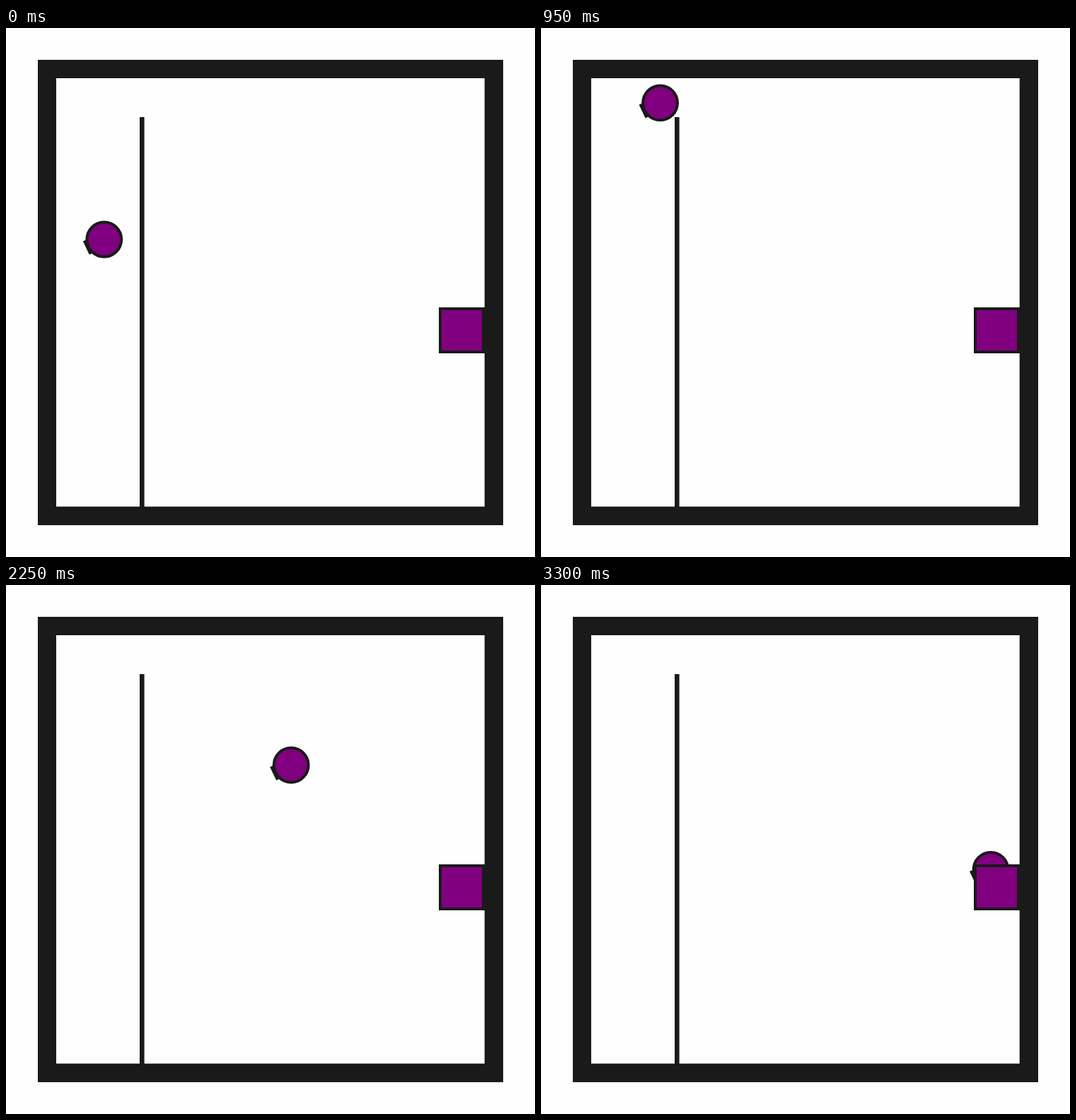
Animation of 748 by 748 pixels, one loop 3350 ms. Source, as an HTML page:

```html
<!DOCTYPE html>
<html lang="en">
<head>
<meta charset="utf-8">
<title>Maze agent</title>
<style>
  html, body { margin: 0; width: 100%; height: 100%; overflow: hidden; background: #fefefe; }
  svg { display: block; width: 100vw; height: 100vh; }
  .wall { fill: #1a1a1a; }
  .piece { fill: #800080; stroke: #1a1a1a; stroke-width: 4; }
</style>
</head>
<body>
<svg viewBox="0 0 748 748">
  <rect class="wall" x="45" y="45" width="658" height="658"/>
  <rect x="71" y="71" width="605.7" height="605.7" fill="#fefefe"/>
  <rect class="wall" x="189" y="126" width="6.6" height="552"/>
  <g id="agent">
    <rect class="wall" x="-28.2" y="-10.5" width="6" height="21" transform="rotate(-25.3)"/>
    <circle class="piece" r="24.4"/>
  </g>
  <rect class="piece" x="614" y="397" width="61" height="61"/>
</svg>
<script>
const STEP = 50, STEPS = 67;
const agent = document.getElementById('agent');

// A path between key points, walked at constant speed; returns a function of progress 0..1.
function route(d) {
  const path = document.createElementNS('http://www.w3.org/2000/svg', 'path');
  path.setAttribute('d', d);
  const length = path.getTotalLength();
  return k => path.getPointAtLength(length * k);
}

const climb = route('M138.8 299L162 301V225L139 207.5V181.3L137.8 130L178.7 98');
const descend = route('M178.7 98H229L236.4 111.8L269.5 168.5L310.5 202.6L402.4 254.3L557.2 331.8L636 402.4');

// The agent waits against the top wall between the routes, then hesitates for one step.
function position(step) {
  if (step <= 22) return climb(Math.min(step, 20) / 20);
  const moves = step - 22 - (step >= 25);
  return descend(moves / 43);
}

function draw() {
  const { x, y } = position(Math.floor(performance.now() / STEP) % STEPS);
  agent.setAttribute('transform', `translate(${x} ${y})`);
  requestAnimationFrame(draw);
}
draw();
</script>
</body>
</html>
```
